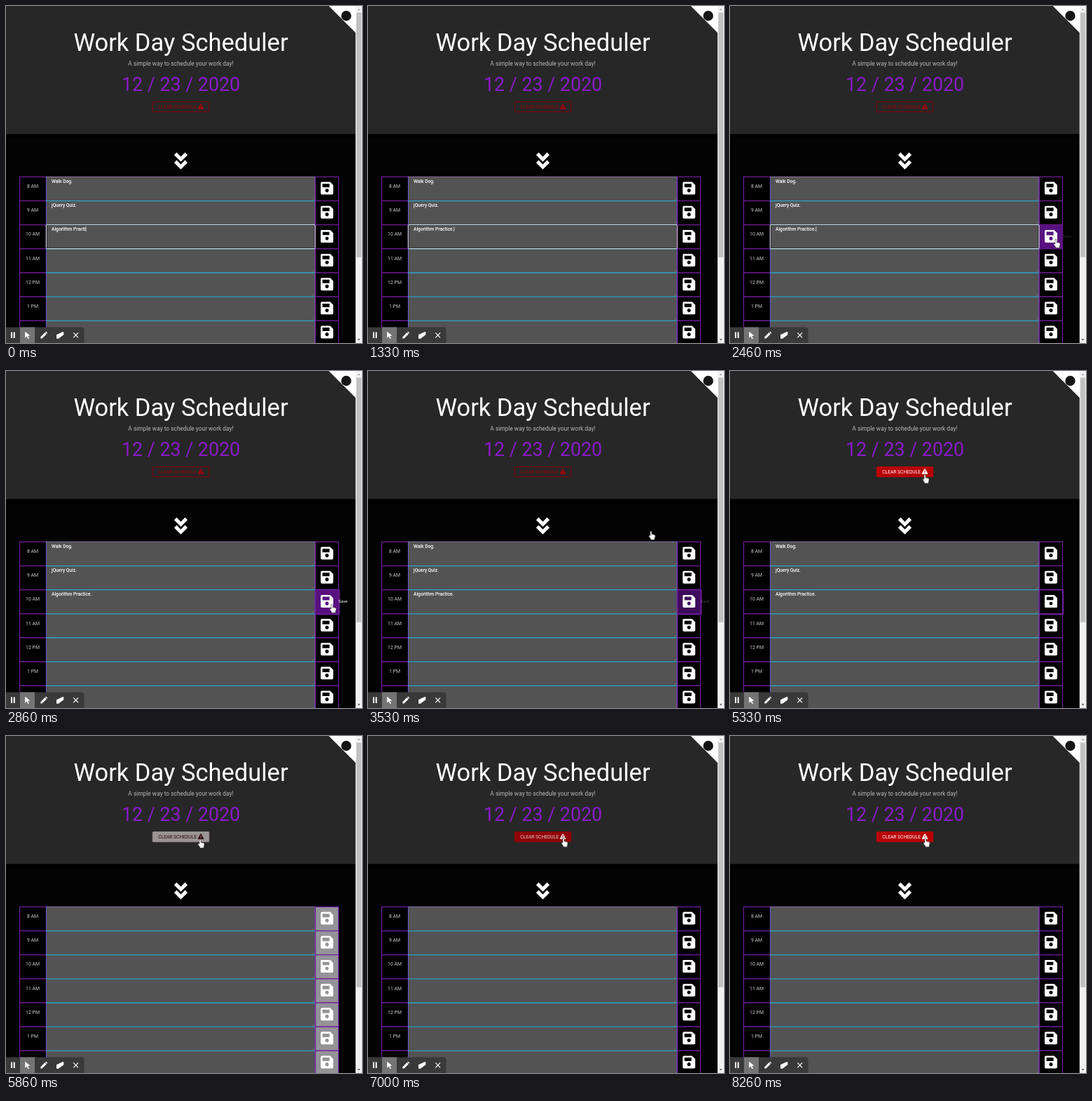
Write an HTML page that moves like this. It is 508 px wide and 480 px high and loops after 8330 ms.

```html
<!DOCTYPE html>
<html lang="en">
<head>
<meta charset="utf-8">
<title>Work Day Scheduler</title>
<style>
html, body { margin: 0; width: 100%; height: 100%; overflow: hidden; background: #000; }
svg { display: block; width: 508px; height: 480px; font-family: Roboto, sans-serif; }

.title { font-size: 34.5px; fill: #fff; }
.lead { font-size: 8.4px; fill: #b8b8b8; }
.date { font-size: 26.8px; fill: #8b1ac8; }
.mid { text-anchor: middle; }
.hour { font-size: 6.9px; fill: #ccc; text-anchor: middle; }
.entries { font-size: 6.65px; font-weight: 500; fill: #fff; }
.cell { fill: #000; stroke: #721d9c; stroke-width: 1.2; }
.area { fill: #535353; }
.icon { fill: #fff; fill-rule: evenodd; }

.entries, .char, .caret, .caret line, .field, .glow, .pointer, .arrow, .hand {
  animation: 8330ms step-end infinite;
}
.clear, .label, .save, .hover, .tip, .cursor { animation: 8330ms linear infinite; }

/* typing */
.entries { animation-name: entries; }
.c { animation-name: type-c; }
.e { animation-name: type-e; }
.dot { animation-name: type-dot; }
.caret { animation-name: caret; }
.caret line { animation-name: blink; }
.field { animation-name: field; }
.glow { animation-name: glow; }
@keyframes entries { 0% { opacity: 1 } 69.6%, 100% { opacity: 0 } }
@keyframes type-c { 0% { fill-opacity: 0 } .7%, 100% { fill-opacity: 1 } }
@keyframes type-e { 0% { fill-opacity: 0 } 3.9%, 100% { fill-opacity: 1 } }
@keyframes type-dot { 0% { fill-opacity: 0 } 15.9%, 100% { fill-opacity: 1 } }
@keyframes caret {
  0% { transform: translateX(114px) }
  .7% { transform: translateX(117.6px) }
  3.9% { transform: translateX(121.2px) }
  15.9%, 100% { transform: translateX(122.8px) }
}
@keyframes blink {
  0%, 15.9%, 29.4% { opacity: 1 }
  12%, 23.1%, 32.4%, 100% { opacity: 0 }
}
@keyframes field { 0% { opacity: 1 } 32.4%, 100% { opacity: 0 } }
@keyframes glow { 0%, 64.8%, 100% { opacity: 0 } 32.4% { opacity: 1 } }

/* buttons */
.save { animation-name: save; }
.hover { animation-name: hover; }
.tip { animation-name: tip; font-size: 6.1px; fill: #fff; }
.clear { animation-name: clear; }
.label { animation-name: label; font-size: 6.7px; fill: currentColor; }
@keyframes save {
  0%, 69.6% { fill: #000 }
  69.61% { fill: #e4e4e4 }
  70.35% { fill: #959499 }
  71.2% { fill: #333 }
  72%, 100% { fill: #000 }
}
@keyframes hover {
  0%, 26.4% { opacity: 0 }
  29.4%, 40.8% { opacity: 1 }
  42.38% { opacity: .72 }
  44.5%, 100% { opacity: 0 }
}
@keyframes tip {
  0%, 29.2% { opacity: 0 }
  29.53% { opacity: .15 }
  31.2%, 40.8% { opacity: 1 }
  42.38% { opacity: .22 }
  43%, 100% { opacity: 0 }
}
@keyframes clear {
  0%, 57% { fill: #272727; stroke: #8c000b }
  61%, 69.6% { fill: #b80006; stroke: #b80006 }
  69.61% { fill: #dcd8d8; stroke: #dcd8d8 }
  70.35% { fill: #9b9696; stroke: #9b9292 }
  72%, 82.2% { fill: #272727; stroke: #8c000b }
  84.03% { fill: #8f0006; stroke: #8f0006 }
  87%, 100% { fill: #b80006; stroke: #b80006 }
}
@keyframes label {
  0%, 57% { color: #a0000b }
  61%, 69.6% { color: #fff }
  69.61% { color: #000 }
  70.35% { color: #2a0508 }
  72%, 82.2% { color: #a0000b }
  84.03% { color: #e8d2d2 }
  87%, 100% { color: #fff }
}

/* mouse */
.cursor { animation-name: move; }
.pointer { animation-name: show; }
.arrow { animation-name: arrow; }
.hand { animation-name: hand; }
@keyframes move {
  0%, 26.4% { transform: translate(444px, 325px) }
  29.4%, 40.8% { transform: translate(465px, 332px) }
  42.38% { transform: translate(404px, 228px) }
  44.5% { transform: translate(340px, 200px) }
  47.2%, 49.5% { transform: translate(304px, 195px) }
  51.1%, 55.2% { transform: translate(291px, 197px) }
  57% { transform: translate(285px, 153px) }
  60.7%, 62.4% { transform: translate(279px, 148px) }
  65.5%, 82.2% { transform: translate(277px, 147px) }
  84.03%, 100% { transform: translate(279px, 145.5px) }
}
@keyframes show { 0% { opacity: 0 } 26.4%, 100% { opacity: 1 } }
@keyframes arrow { 0%, 57%, 100% { opacity: 0 } 43% { opacity: 1 } }
@keyframes hand { 0%, 57%, 100% { opacity: 1 } 43% { opacity: 0 } }
</style>
</head>
<body>
<svg viewBox="0 0 508 480">
  <defs>
    <path id="disk" class="icon" d="M2 0H13.5L18 4.5V16a2 2 0 0 1-2 2H2a2 2 0 0 1-2-2V2a2 2 0 0 1 2-2ZM2.6 2.6V7.6H12.6V2.6ZM9 9.6a2.6 2.6 0 1 0 .01 0Z"/>
  </defs>
  <rect width="508" height="480" fill="#030303"/>

  <!-- header -->
  <rect y="182" width="499" height="7"/>
  <rect width="499" height="182.3" fill="#272727"/>
  <text class="title mid" x="249.5" y="64">Work Day Scheduler</text>
  <text class="lead mid" x="249.5" y="85">A simple way to schedule your work day!</text>
  <text class="date mid" x="249.5" y="121">12 / 23 / 2020</text>
  <rect class="clear" x="209.3" y="136.5" width="80.4" height="14.2" rx="1"/>
  <g class="label">
    <text x="217.2" y="145.7">CLEAR SCHEDULE</text>
    <path fill-rule="evenodd" d="M278 139.2Q278.5 139.2 278.8 139.7L282.2 146Q282.4 147 281.6 147H274.4Q273.6 147 273.8 146L277.2 139.7Q277.5 139.2 278 139.2ZM277.5 141.6V144.2H278.5V141.6ZM277.5 145V146H278.5V145Z"/>
  </g>
  <path d="M460.7 0H499V38.3Z" fill="#fff"/>
  <circle cx="485.5" cy="14" r="7.2" fill="#151515"/>

  <path d="M241.7 210.4L249.5 218.2L257.3 210.4M241.7 221.4L249.5 229.2L257.3 221.4" fill="none" stroke="#fff" stroke-width="5.1"/>

  <!-- schedule -->
  <g id="rows"></g>
  <g class="entries">
    <text x="65" y="251.7">Walk Dog.</text>
    <text x="65" y="285.8">jQuery Quiz.</text>
    <text x="65" y="320">Algorithm Practi<tspan class="char c">c</tspan><tspan class="char e">e</tspan><tspan class="char dot">.</tspan></text>
  </g>
  <g class="caret"><line y1="314" y2="321" stroke="#fff" stroke-width=".7"/></g>
  <g class="field" fill="none">
    <rect x="58.2" y="312.6" width="382" height="32.2" stroke="#181818" stroke-width=".8"/>
    <rect x="57.3" y="311.7" width="383.8" height="34" rx="1.2" stroke="#e4e4e4"/>
  </g>
  <rect class="hover" x="442" y="312" width="32.5" height="33.5" fill="#581080"/>
  <rect class="glow" x="441.5" y="311.5" width="34" height="35" rx="1.5" fill="none" stroke="#641a8c" stroke-width="1.8"/>
  <use href="#disk" x="449" y="319"/>
  <text class="tip" x="474.3" y="330">Save</text>

  <!-- recorder bar -->
  <path d="M0 457.5H108Q111.5 457.5 111.5 461V480H0Z" fill="#393939"/>
  <rect x="20" y="457.5" width="21" height="22.5" fill="#747474"/>
  <g fill="#fff">
    <path d="M7 464.5h2v8.5h-2zM10.7 464.5h2v8.5h-2z"/>
    <path d="M27.2 463.8L34.3 469.5L31.2 469.9L33 473.6L31.5 474.3L29.7 470.6L27.2 472.7Z"/>
    <path d="M49.3 473.6V471.4L55.6 465.1L57.8 467.3L51.5 473.6ZM56.2 464.5L57.2 463.6L59.3 465.7L58.4 466.7Z"/>
    <path d="M72 468.3L80.5 464.2H82.3V468.3L75 473.7H72Z"/>
    <path d="M96.3 465.3L103.1 472.3M103.1 465.3L96.3 472.3" stroke="#fff" stroke-width="1.2"/>
  </g>

  <!-- scrollbar -->
  <rect x="498.8" width="9.2" height="480" fill="#f1f1f1"/>
  <rect x="500" y="9.5" width="7" height="348.3" fill="#c1c1c1"/>
  <path d="M501.5 6L503.5 3.7L505.5 6Z" fill="#a3a3a3"/>
  <path d="M501.5 474.2L503.5 476.5L505.5 474.2Z" fill="#505050"/>

  <g class="cursor"><g class="pointer" stroke="#111" stroke-width=".5" fill="#fff">
    <path class="arrow" d="M0 0V9.2L2.1 7.3L3.6 10.6L5 10L3.6 6.8H6.3Z"/>
    <path class="hand" d="M-1.1 .9C-1.1-.4 1.1-.4 1.1 .9V4.6L2.6 4.7L4.2 5.1L5.6 5.8Q6.3 6.4 6.1 7.8L5.3 10.6V12.6H-.4V11.2L-3 7.6C-3.6 6.2-2.4 5.6-1.1 6.8Z"/>
  </g></g>
</svg>
<script>
const hours = ["8 AM", "9 AM", "10 AM", "11 AM", "12 PM", "1 PM", "2 PM"];
const pitch = 34.15;

function row(hour, i) {
  const y = 243.4 + pitch * i;
  return `
    <rect class="cell" x="19.5" y="${y}" width="38" height="${pitch}"/>
    <text class="hour" x="38" y="${y + 15.7}">${hour}</text>
    <rect class="area" x="57" y="${y}" width="384" height="${pitch}"/>
    <path d="M57.5 ${y}v${pitch}M441 ${y}v${pitch}" stroke="#6a5ccc"/>
    <path d="M57 ${y}H441" stroke="${i ? "#2aa3c8" : "#7d6a96"}" stroke-width="1.3"/>
    <path d="M437 ${y + 33}l3-3M439 ${y + 33}l1-1" stroke="#888" stroke-width=".5"/>
    <rect class="cell save" x="441.5" y="${y}" width="33" height="${pitch}"/>
    <use href="#disk" x="449" y="${y + 7.2}"/>`;
}

document.getElementById("rows").innerHTML = hours.map(row).join("");
</script>
</body>
</html>
```
